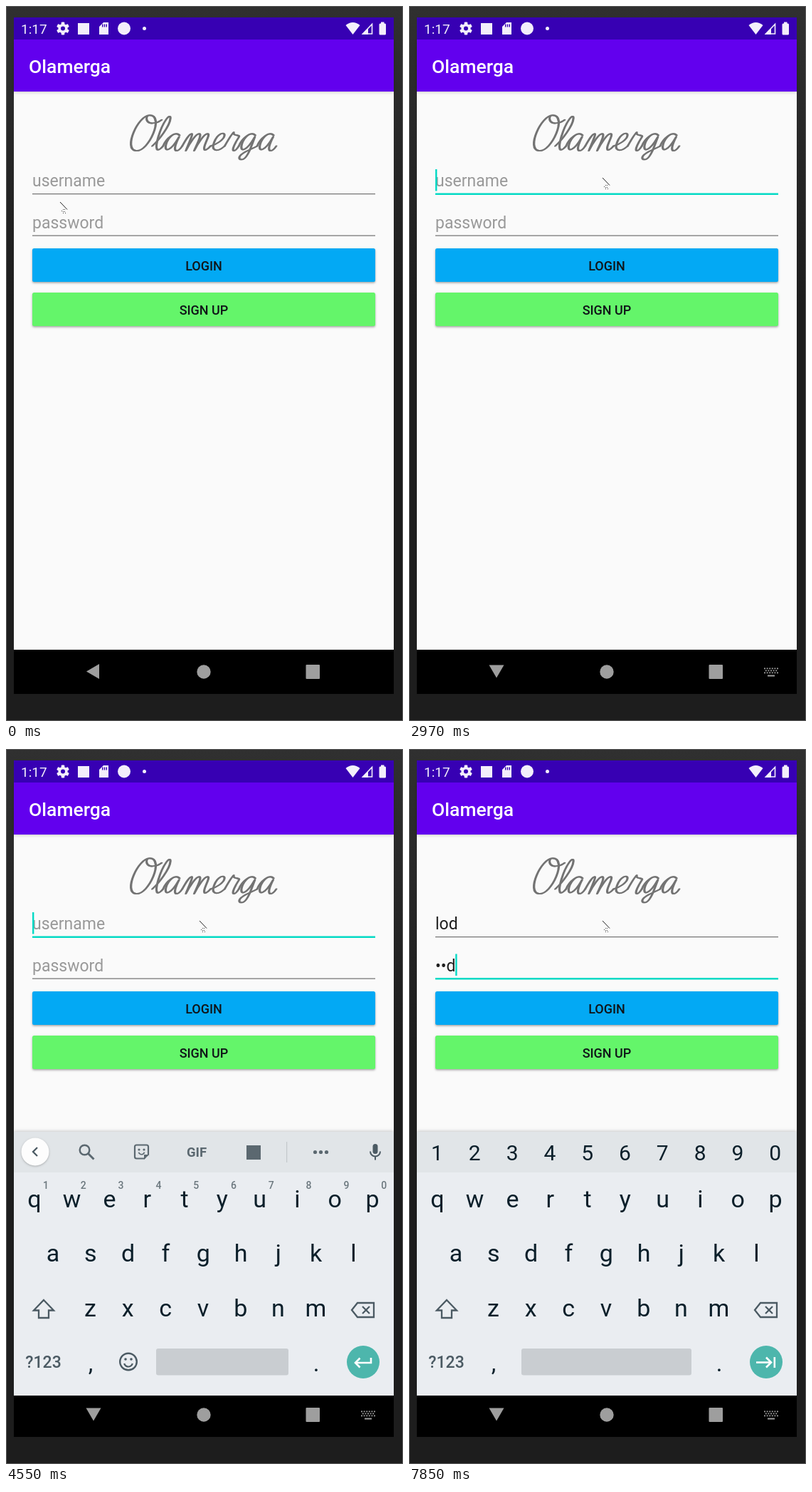
Animation, 558 px wide and 1003 px high, one loop 8000 ms. Source, as an HTML page with a canvas:

```html
<!DOCTYPE html>
<html lang="en">
<head>
<meta charset="utf-8">
<title>Login screen</title>
<style>
html, body { margin: 0; width: 100%; height: 100%; overflow: hidden; background: #1e1e1e; }
canvas { display: block; width: 558px; height: 1003px; }
</style>
</head>
<body>
<canvas id="stage" width="558" height="1003"></canvas>
<script>
const ctx = document.getElementById('stage').getContext('2d');
const LOOP = 8000, TEAL = '#03dac5', ICON = '#4b5a63', KEY = '#0b1f2a';
const APP = 'Olamerga', USER = 'lod';

const clamp = v => Math.max(0, Math.min(1, v));
const progress = (t, a, b) => clamp((t - a) / (b - a));

function rect(x, y, w, h, color, r = 0) {
  ctx.fillStyle = color;
  ctx.beginPath();
  ctx.roundRect(x, y, w, h, r);
  ctx.fill();
}

function disc(x, y, r, color) {
  ctx.fillStyle = color;
  ctx.beginPath();
  ctx.arc(x, y, r, 0, Math.PI * 2);
  ctx.fill();
}

function trace(points, closed) {
  ctx.beginPath();
  points.forEach(([x, y]) => ctx.lineTo(x, y));
  if (closed) ctx.closePath();
}

function poly(points, color) {
  trace(points, true);
  ctx.fillStyle = color;
  ctx.fill();
}

function line(points, color, width, closed = false) {
  trace(points, closed);
  ctx.strokeStyle = color;
  ctx.lineWidth = width;
  ctx.stroke();
}

function arc(x, y, r, a, b, color, width) {
  ctx.beginPath();
  ctx.arc(x, y, r, a, b);
  ctx.strokeStyle = color;
  ctx.lineWidth = width;
  ctx.stroke();
}

function text(str, x, y, size, color, { weight = 400, align = 'left' } = {}) {
  ctx.font = `${weight} ${size}px Roboto, sans-serif`;
  ctx.textAlign = align;
  ctx.fillStyle = color;
  ctx.fillText(str, x, y);
}

function withShadow(blur, dy, alpha, draw) {
  ctx.save();
  ctx.shadowColor = `rgba(0,0,0,${alpha})`;
  ctx.shadowBlur = blur;
  ctx.shadowOffsetY = dy;
  draw();
  ctx.restore();
}

// Handwritten letters: advance width and pen path, baseline at y = 0
const BOWL = 'M0-6C1-16 9-26 16-20C10-26 3-18 3-8C3 2 11 2 16-18';
const SCRIPT = {
  O: [30, 'M16-46C2-46-4-2 12 0C28 2 34-46 16-46C10-46 14-34 24-36C28-36 30-38 32-40'],
  l: [13, 'M0-6C6-14 14-32 12-42C10-50 4-38 4-18C4-2 8 4 13-6'],
  a: [23, BOWL + 'C14-8 14 0 18 0C20 0 22-3 23-6'],
  m: [34, 'M0-6C2-14 4-22 7-22C9-22 7-10 6 0C8-10 12-22 16-22C20-22 17-8 16 0C18-10 22-22 26-22C30-22 26-10 27-4C28 2 32-2 34-6'],
  e: [17, 'M0-6C6-8 14-14 13-20C12-25 4-23 3-11C2 0 10 3 17-6'],
  r: [17, 'M0-6C2-14 4-22 6-24C6-18 14-22 14-18C12-12 9 0 13 0C15 0 16-3 17-6'],
  g: [22, BOWL + 'C15-6 15 8 10 11C5 13 2 8 8 3C13-1 18-3 22-6']
};
const pens = Object.fromEntries(Object.entries(SCRIPT).map(([k, [w, d]]) => [k, [w, new Path2D(d)]]));

function scriptLogo() {
  ctx.save();
  ctx.transform(1.17, 0, -0.32, 1.08, 168, 203);
  ctx.strokeStyle = '#737373';
  ctx.lineWidth = 1.8;
  ctx.lineCap = ctx.lineJoin = 'round';
  for (const ch of APP) {
    const [width, path] = pens[ch];
    ctx.stroke(path);
    ctx.translate(0.9, 0);
    ctx.stroke(path);
    ctx.translate(width - 0.9, 0);
  }
  ctx.restore();
}

function deviceFrame() {
  const shade = ctx.createLinearGradient(0, 0, 0, 420);
  shade.addColorStop(0, '#303030');
  shade.addColorStop(1, '#1d1d1d');
  rect(0, 0, 558, 1003, shade);
  ctx.strokeStyle = '#5c5c5c';
  ctx.lineWidth = 1;
  ctx.strokeRect(0.5, 0.5, 557, 1002);
}

function statusBar() {
  const white = '#f3effb', bar = '#3700b3';
  rect(11, 16, 534, 31, bar);
  text('1:17', 21, 39, 19, white);
  for (let i = 0; i < 3; i++) {
    ctx.save();
    ctx.translate(80, 31.5);
    ctx.rotate(i * Math.PI / 3);
    rect(-2.3, -9, 4.6, 18, white, 1);
    ctx.restore();
  }
  disc(80, 31.5, 6.6, white);
  disc(80, 31.5, 3, bar);
  rect(101, 24, 16, 16, white);
  poly([[137, 23], [144, 23], [144, 40], [131, 40], [131, 29]], white);
  for (let i = 0; i < 3; i++) rect(135 + i * 2.8, 25.5, 1.4, 4, bar);
  disc(166, 31.5, 9, white);
  disc(194.5, 31.5, 2.5, white);

  ctx.beginPath();
  ctx.moveTo(487.5, 40);
  ctx.lineTo(477.5, 27);
  ctx.quadraticCurveTo(487.5, 19, 497.5, 27);
  ctx.fillStyle = white;
  ctx.fill();
  line([[501.5, 39], [514.5, 25.5], [514.5, 39]], white, 1.6, true);
  poly([[500, 40], [509, 31], [509, 40]], white);
  rect(524.5, 24.5, 9.5, 16, white, 1.5);
  rect(527, 22.5, 4.5, 3, white);
}

function button(label, y, color) {
  withShadow(3, 1.5, 0.35, () => rect(37, y, 482, 47, color, 2.5));
  text(label, 278, y + 30.5, 18, '#101418', { weight: 500, align: 'center' });
}

function field({ hint, value, y, focused, caret, composing }) {
  text(value || hint, 37, y, 23, value ? '#1f1f1f' : '#999');
  const end = value ? 37 + ctx.measureText(value).width : 37;
  if (composing) rect(37, y + 2.5, end - 37, 1.4, '#333');
  if (focused) rect(37, y + 9.5, 482, 2.6, TEAL);
  else rect(37, y + 10, 482, 1.2, '#757575');
  if (focused && caret) rect(value ? end - 0.3 : 37, y - 24, 2.4, 30.5, TEAL);
}

function navBar(t) {
  const grey = '#9e9e9e', turn = progress(t, 2780, 2940);
  rect(11, 903, 534, 62, '#000');
  ctx.save();
  ctx.translate(123, 933.5 - turn);
  ctx.rotate(-turn * Math.PI / 2);
  poly([[-10, 0], [8, -10.5], [8, 10.5]], grey);
  ctx.restore();
  disc(278, 934, 9.7, grey);
  rect(421.5, 924, 19.5, 20, grey, 1);
  ctx.save();
  ctx.globalAlpha = turn;
  for (let row = 0; row < 3; row++)
    for (let i = 0; i < 6 - row % 2; i++)
      rect(499 + i * 3.6 + row % 2 * 1.8, 928.5 + row * 3, 2, 1.7, grey);
  rect(504, 938.5, 10, 2, grey);
  ctx.restore();
}

function chevron(pointsLeft) {
  withShadow(3, 1, 0.25, () => disc(41, 565, 19.5, '#fdfdfd'));
  const d = pointsLeft ? 3 : -3;
  line([[41 + d, 559], [41 - d, 565], [41 + d, 571]], ICON, 2.3);
}

function microphone() {
  rect(515.5, 554, 7, 14, ICON, 3.5);
  arc(519, 564.5, 7, 0, Math.PI, ICON, 2);
  rect(518, 571.5, 2, 5, ICON);
}

function tools() {
  const grey = '#5b6870';
  arc(110.5, 562.5, 6.8, 0, Math.PI * 2, grey, 2.5);
  line([[115.5, 567.5], [123.5, 575.5]], grey, 3);
  ctx.beginPath();
  ctx.roundRect(181, 555.5, 19, 19, 2.5);
  ctx.strokeStyle = grey;
  ctx.lineWidth = 2.2;
  ctx.stroke();
  poly([[201, 569], [201, 576], [194, 576]], '#e1e5e8');
  poly([[194, 576], [194, 569], [201, 569]], grey);
  disc(187, 562, 1.6, grey);
  disc(194, 562, 1.6, grey);
  arc(190.5, 564.5, 4.2, 0.3, Math.PI - 0.3, grey, 1.8);
  text('GIF', 268, 571.5, 18.5, grey, { weight: 700, align: 'center' });
  rect(338, 556, 20, 20, grey);
  rect(394, 551, 1.2, 29, '#c3c8cb');
  for (const x of [434.5, 442.5, 450.5]) disc(x, 565.5, 2.6, grey);
}

function suggestions(words) {
  words.forEach((word, i) => text(word, 128 + i * 147.5, 574, 23, '#5b6870', { align: 'center' }));
  rect(198, 550, 1.2, 30, '#c3c8cb');
  rect(354, 550, 1.2, 30, '#c3c8cb');
}

function keyRow(keys, x, y, size = 34) {
  [...keys].forEach((key, i) => text(key, x + i * 52.8, y, size, KEY, { align: 'center' }));
}

function enterKey(isPassword) {
  disc(502, 860, 23, '#4db6ac');
  if (isPassword) {
    line([[488, 860.5], [508, 860.5]], '#fff', 2.6);
    line([[502, 853.5], [509, 860.5], [502, 867.5]], '#fff', 2.6);
    rect(512.5, 853, 2.6, 15, '#fff');
  } else {
    line([[513, 854], [513, 861], [491, 861]], '#fff', 2.6);
    line([[497.5, 854.5], [491, 861], [497.5, 867.5]], '#fff', 2.6);
  }
}

function keyboard(t, isPassword, typed) {
  const shown = progress(t, 2985, 3080);
  if (shown <= 0) return;
  const alpha = t < 3110 ? 0.95 * shown : 1;
  ctx.save();
  ctx.globalAlpha = alpha;
  ctx.translate(0, t < 3110 ? 4.5 + 30 * (1 - progress(t, 2985, 3060)) : 0);
  ctx.beginPath();
  ctx.rect(11, 530, 534, 377);
  ctx.clip();
  withShadow(4, -1, 0.2, () => rect(11, 537, 534, 370, '#eaedf1'));
  rect(11, 537, 534, 57, '#e1e5e8');

  if (isPassword) {
    keyRow('1234567890', 39.5, 577, 30);
  } else {
    const open = t >= 3140 && !typed;
    chevron(open);
    microphone();
    if (open) {
      ctx.save();
      ctx.globalAlpha = progress(t, 3110, 3170);
      tools();
      ctx.restore();
    }
    if (typed) suggestions([['l', 'like', 'let'], ['lo', 'look', 'lot'], [USER, 'lodge', 'did']][typed.length - 1]);
    [...'1234567890'].forEach((n, i) =>
      text(n, 56 + i * 52.8, 617, 14, '#6b777e', { weight: 500, align: 'center' }));
  }

  keyRow('qwertyuiop', 39.8, 643);
  keyRow('asdfghjkl', 66, 719);
  keyRow('zxcvbnm', 118.5, 796);
  line([[53, 773], [67, 787.5], [60, 787.5], [60, 798], [46, 798], [46, 787.5], [39, 787.5]], ICON, 2.3, true);
  line([[486, 787], [494, 777], [517, 777], [517, 797], [494, 797]], ICON, 2.3, true);
  line([[501, 782], [511, 792]], ICON, 2.3);
  line([[511, 782], [501, 792]], ICON, 2.3);

  text('?123', 52.5, 868, 23, ICON, { weight: 500, align: 'center' });
  text(',', 119, 873, 33, KEY, { align: 'center' });
  text('.', 436, 873, 33, KEY, { align: 'center' });
  if (!isPassword) {
    arc(172, 859.5, 11.8, 0, Math.PI * 2, ICON, 2.4);
    disc(168, 856, 1.8, ICON);
    disc(176, 856, 1.8, ICON);
    arc(172, 860.5, 6, 0.25, Math.PI - 0.25, ICON, 2.2);
  }
  const left = isPassword ? 158 : 211;
  rect(left, 841, 397 - left, 37.5, '#c9cdd1', 3);
  enterKey(isPassword);
  ctx.restore();
}

// Pointer waypoints: time, x, y
const TRAIL = [
  [1280, 76, 275], [1400, 30, 335], [1540, 190, 170], [1680, 400, 80], [1790, 535, 140],
  [1870, 530, 285], [1950, 425, 275], [2080, 330, 246], [2250, 288, 219], [2450, 272, 241]
];

function pointerAt(t) {
  const last = TRAIL.length - 1;
  if (t <= TRAIL[0][0]) return TRAIL[0].slice(1);
  if (t >= TRAIL[last][0]) return TRAIL[last].slice(1);
  const i = TRAIL.findIndex(p => p[0] > t) - 1;
  const p = k => TRAIL[Math.max(0, Math.min(last, i + k))];
  const u = progress(t, p(0)[0], p(1)[0]);
  return [1, 2].map(k => {
    const [a, b, c, d] = [p(-1)[k], p(0)[k], p(1)[k], p(2)[k]];
    return b + u / 2 * (c - a + u * (2 * a - 5 * b + 4 * c - d + u * (3 * (b - c) + d - a)));
  });
}

function pointer(t) {
  const [x, y] = pointerAt(t).map(Math.round);
  line([[x, y], [x + 10, y + 10.5]], '#222', 1);
  for (const [dx, dy] of [[4, 10], [6, 10], [2, 12], [4, 13], [6, 13], [4, 15], [7, 15]])
    rect(x + dx, y + dy, 1, 1, '#444');
}

const caretOn = t => [[2560, 3060], [3560, 4060], [4550, 5080], [5360, 6080], [6440, 6930], [7430, LOOP]]
  .some(([a, b]) => t >= a && t < b);

function draw(t) {
  const typed = USER.slice(0, [5360, 5420, 5570].filter(k => t >= k).length);
  const secretLength = [7610, 7730, 7850].filter(k => t >= k).length;
  const secret = secretLength ? '•'.repeat(secretLength - 1) + USER[secretLength - 1] : '';
  const isPassword = t >= 6440, caret = caretOn(t);

  deviceFrame();
  rect(11, 120, 534, 783, '#fafafa');
  withShadow(4, 1, 0.2, () => rect(11, 47, 534, 73, '#6200ee'));
  statusBar();
  text(APP, 32, 93.5, 26.5, '#fff', { weight: 500 });
  scriptLogo();
  field({ hint: 'username', value: typed, y: 253, focused: t >= 2560 && !isPassword, caret, composing: typed && !isPassword });
  field({ hint: 'password', value: secret, y: 311.5, focused: isPassword, caret });
  button('LOGIN', 340, '#03a9f4');
  button('SIGN UP', 402, '#64f56a');
  navBar(t);
  keyboard(t, isPassword, typed);
  pointer(t);
}

function tick() {
  draw(performance.now() % LOOP);
  requestAnimationFrame(tick);
}
tick();
</script>
</body>
</html>
```
